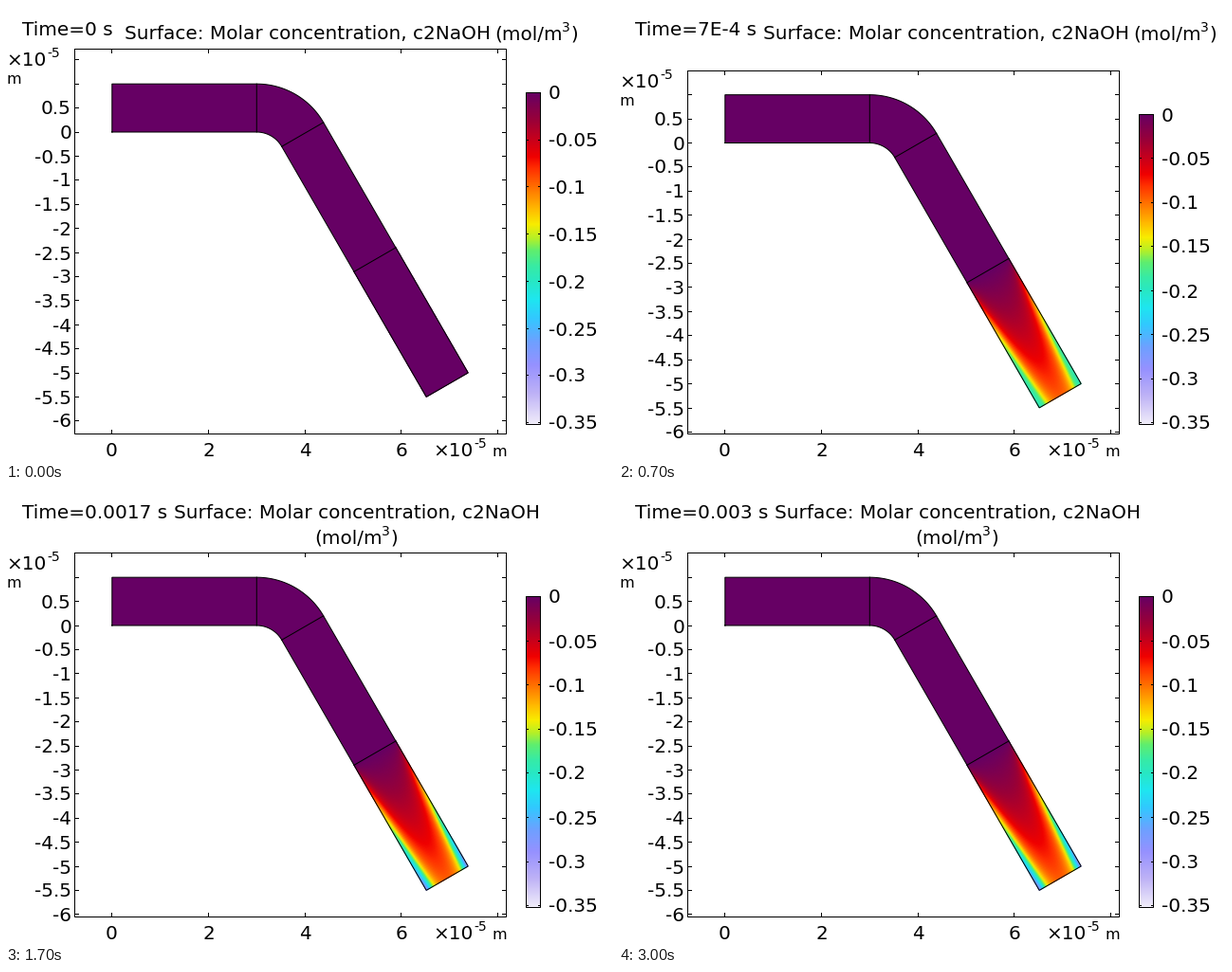
A matplotlib script that plays this animation: 640x480 px, repeating every 3100 ms.

```python
import numpy as np
import matplotlib.pyplot as plt
from matplotlib.animation import FuncAnimation
from matplotlib.colors import LinearSegmentedColormap

plt.rcParams["font.family"] = "DejaVu Sans"

W, H, DPI = 640, 480, 100
PX = 72 / DPI            # one pixel in points
FRAMES, STEP_MS = 31, 100
UNIT = 50.83             # pixels per 1e-5 m
X0 = 111.8
LEFT, RIGHT, BOTTOM = 72.5, 527.5, 451.5
C_MAX = 0.352

STOPS = [
    (0, (102, 0, 100)), (0.03, (155, 0, 55)), (0.05, (200, 0, 27)),
    (0.068, (240, 0, 0)), (0.08, (255, 45, 0)), (0.1, (255, 110, 0)),
    (0.125, (255, 190, 0)), (0.14, (248, 236, 0)), (0.155, (180, 240, 40)),
    (0.168, (95, 238, 110)), (0.185, (55, 235, 165)), (0.2, (40, 232, 195)),
    (0.22, (30, 230, 240)), (0.24, (50, 200, 255)), (0.265, (110, 160, 255)),
    (0.29, (150, 145, 255)), (0.32, (190, 178, 246)), (C_MAX, (240, 236, 250)),
]
CMAP = LinearSegmentedColormap.from_list(
    "prism", [(v / C_MAX, tuple(c / 255 for c in rgb)) for v, rgb in STOPS], N=1024)


def solve_field(length=3.0, ns=121, nw=49, sub=40):
    """Consumption in a channel with parabolic flow; time unit is 1e-4 s."""
    rate, diff, speed, slip = 0.0273, 0.0005, 0.70, 0.17
    ds, dw, dt = length / (ns - 1), 1 / (nw - 1), 1 / sub
    w = np.linspace(0, 1, nw)
    u = 4 * speed * w * (1 - w) + slip
    q = np.zeros((ns, nw))
    out = [q[::2].copy()]
    for _ in range(FRAMES - 1):
        for _ in range(sub):
            p = np.pad(q, ((0, 0), (1, 1)), mode="reflect")
            spread = diff * (p[:, 2:] - 2 * q + p[:, :-2]) / dw**2
            flow = u * (q[1:] - q[:-1]) / ds
            q[1:] += dt * (rate + spread[1:] - flow)
        out.append(q[::2].copy())
    return out


FIELD = solve_field()

# Channel geometry in units of 1e-5 m
BEND = np.array([3, -0.6])
R_IN, R_OUT = 0.6, 1.6
DIR = np.array([0.5, -np.sqrt(3) / 2])
ACROSS = np.array([-np.sqrt(3) / 2, -0.5])


def arc(radius):
    a = np.radians(np.linspace(90, 30, 40))
    return BEND + radius * np.column_stack([np.cos(a), np.sin(a)])


OUTER, INNER = arc(R_OUT), arc(R_IN)
OUT_A, IN_A = OUTER[-1], INNER[-1]
OUTLINE = np.vstack([[(0, 0), (0, 1)], OUTER, [OUT_A + 6 * DIR, IN_A + 6 * DIR],
                     INNER[::-1], [(0, 0)]])
SEAMS = [np.array(s) for s in ([(3, 0), (3, 1)], [OUT_A, IN_A],
                               [OUT_A + 3 * DIR, IN_A + 3 * DIR])]
S, V = np.meshgrid(np.linspace(3, 6, FIELD[0].shape[0]),
                   np.linspace(0, 1, FIELD[0].shape[1]), indexing="ij")
GRID = OUT_A + S[..., None] * DIR + V[..., None] * ACROSS

fig = plt.figure(figsize=(W / DPI, H / DPI), dpi=DPI, facecolor="white")
ax = fig.add_axes([0, 0, 1, 1])


def text(x, y, s, size=20, ha="left"):
    ax.text(x, y, s, fontsize=size * PX, ha=ha, va="baseline", color="black")


def line(xs, ys, z=4):
    ax.plot(xs, ys, color="black", lw=PX, zorder=z, snap=False,
            solid_joinstyle="miter", solid_capstyle="projecting")


def crisp(v):
    """Centre of the pixel that holds v."""
    return np.floor(v) + 0.5


def power(x, y):
    text(x, y, "×10")
    text(x + 43, y - 9, "-5", 14)


def mol_unit(x, y):
    text(x, y, "(mol/m")
    text(x + 71, y - 8, "3", 14)
    text(x + 80, y, ")")


def header(i):
    """Draw the titles; return plot top, zero line and colour bar top."""
    if i == 0:
        stamp, x, layout = "0", 125, (45.5, 133.0, 91.5)
    elif i < 10:
        stamp, x, layout = f"{i}E-4", 152, (68.5, 144.5, 114.5)
    else:
        stamp, x = f"{i / 1e4:g}", 164 if i % 10 == 0 else 177
        layout = (67.5, 144.0, 113.5)
    wrapped = i >= 10
    y = 31 if wrapped else 35
    text(17, 31, f"Time={stamp} s")
    text(x, y, "Surface: Molar concentration, c2NaOH")
    mol_unit(*((x + 148, 57) if wrapped else (x + 390, y)))
    return layout


def axes_box(top, y0):
    line([LEFT, RIGHT, RIGHT, LEFT, LEFT], [top, top, BOTTOM, BOTTOM, top])
    for v in range(0, 9, 2):
        x = crisp(X0 + v * UNIT)
        line([x, x], [BOTTOM - 4, BOTTOM])
        line([x, x], [top, top + 4])
        if v < 8:
            text(x, 475, str(v), ha="center")
    for v in np.arange(1.5, -6.1, -0.5):
        y = crisp(y0 - v * UNIT)
        line([LEFT, LEFT + 4], [y, y])
        line([RIGHT - 4, RIGHT], [y, y])
        if v < 1:
            text(69, y + 7, f"{v:g}", ha="right")
    power(0, top + 17.5)
    text(1, top + 36.5, "m", 16)
    power(450, 475)
    text(512, 475, "m", 16)


def color_bar(top, left=548.5, right=563.5, bottom=441.5):
    ax.imshow(np.linspace(0, 1, 512)[:, None], cmap=CMAP, aspect="auto",
              extent=(left, right, bottom, top), zorder=1)
    line([left, right, right, left, left], [top, top, bottom, bottom, top])
    for k in range(8):
        v = 0.05 * k
        y = crisp(top + (bottom - top) * v / C_MAX)
        line([left, left + 2], [y, y])
        line([right - 2, right], [y, y])
        text(572, y + 7, f"{-v:g}" if k else "0")


def channel(i, y0):
    def px(p):
        return X0 + p[..., 0] * UNIT, y0 - p[..., 1] * UNIT

    ax.fill(*px(OUTLINE), color=CMAP(0.0), lw=0, zorder=1)
    ax.pcolormesh(*px(GRID), FIELD[i], cmap=CMAP, vmin=0, vmax=C_MAX,
                  shading="gouraud", zorder=2)
    for path in [OUTLINE, *SEAMS]:
        line(*px(path), z=3)


def draw(i):
    ax.clear()
    top, y0, bar_top = header(i)
    channel(i, y0)
    axes_box(top, y0)
    color_bar(bar_top)
    ax.set_xlim(0, W)
    ax.set_ylim(H, 0)
    ax.axis("off")
    return []


anim = FuncAnimation(fig, draw, frames=FRAMES, interval=STEP_MS,
                     repeat=True, repeat_delay=0, blit=False)
plt.show()
```
